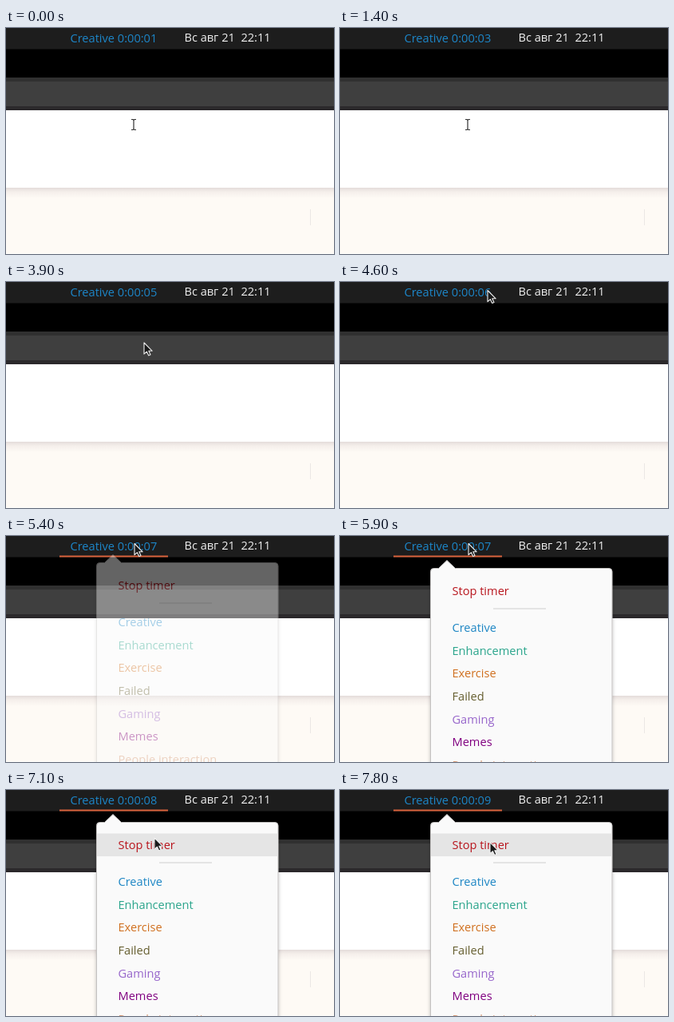
These frames come from a looping animation (411x283 px, 8 s). An HTML page:

```html
<!DOCTYPE html>
<html lang="en">
<head>
<meta charset="utf-8">
<title>Timer menu</title>
<style>
  html, body { margin: 0; width: 100%; height: 100%; overflow: hidden; background: #fff; }
  svg { display: block; width: 411px; height: 283px; }
  text { font: 14.6px "Open Sans", "Noto Sans", sans-serif; }
</style>
</head>
<body>
<svg viewBox="0 0 411 283" xmlns="http://www.w3.org/2000/svg">
  <defs>
    <linearGradient id="edge" x2="0" y2="1">
      <stop offset="0" stop-color="#e4dcda"/>
      <stop offset=".4" stop-color="#f5efeb"/>
      <stop offset="1" stop-color="#fefaf5"/>
    </linearGradient>
    <filter id="soft" x="-10%" y="-10%" width="120%" height="120%">
      <feDropShadow dx="0" dy="1" stdDeviation="2" flood-opacity=".25"/>
    </filter>
  </defs>

  <!-- page and window bars -->
  <rect width="411" height="283" fill="#fefaf5"/>
  <rect y="102" width="411" height="98" fill="#fff"/>
  <rect y="200" width="411" height="13" fill="url(#edge)"/>
  <rect x="381" y="227" width="1" height="20" fill="#ebe7e5"/>
  <rect y="282" width="411" height="1" fill="#fdfcfa"/>
  <rect width="411" height="103" fill="#2b292b"/>
  <rect y="62" width="411" height="5" fill="#303030"/>
  <rect y="67" width="411" height="31" fill="#3f3f3f"/>
  <rect y="26" width="411" height="36" fill="#000"/>
  <rect width="411" height="26.5" fill="#1d1d1d"/>

  <text id="timer" x="80.5" y="17.5" fill="#1d86c8"></text>
  <text x="223.5" y="17" fill="#f0f0f0">Вс авг 21&#160;&#160;22:11</text>
  <rect id="line" x="67" y="24.5" width="136" height="2" fill="#d9623c"/>

  <g id="menu">
    <path d="M117.5 40.5H123.5L134 30.5L144.5 40.5H337Q341 40.5 341 44.5V300H113.5V44.5Q113.5 40.5 117.5 40.5Z"
      fill="#fafafa" stroke="#c3c1c0" filter="url(#soft)"/>
    <rect id="hover" x="114" y="54.5" width="226.5" height="28.5" fill="#e5e5e5"/>
    <rect x="192" y="90.5" width="66" height="1" fill="#cfcfcf"/>
    <g id="items"></g>
  </g>

  <path id="beam" d="M-3 -6.5H-1L0 -5.5L1 -6.5H3M0 -5.5V5.5M-3 6.5H-1L0 5.5L1 6.5H3"
    fill="none" stroke="#333" stroke-width="1.2"/>
  <path id="arrow" d="M0 0V14.2L3.4 11.2L5.7 16L8 15L5.8 10.3H10.2Z"
    fill="#1a1a1a" stroke="#eee" stroke-width="1.1" stroke-linejoin="round"/>
</svg>
<script>
const LOOP = 8000, STEP = 100;
const $ = id => document.getElementById(id);

const items = [
  ["Stop timer", 74, "#b8141c"],
  ["Creative", 120, "#1d86c4"],
  ["Enhancement", 148.7, "#2aa58c"],
  ["Exercise", 177.3, "#d0701f"],
  ["Failed", 206, "#665f30"],
  ["Gaming", 234.6, "#9766cb"],
  ["Memes", 263.2, "#800080"],
  ["People interaction", 291.5, "#d59a78"]
];
for (const [label, y, color] of items) {
  const el = document.createElementNS("http://www.w3.org/2000/svg", "text");
  el.setAttribute("x", 140.5);
  el.setAttribute("y", y);
  el.setAttribute("fill", color);
  el.textContent = label;
  $("items").append(el);
}

// [time, seconds shown]
const ticks = [[0, 1], [1000, 2], [1400, 3], [2000, 4], [3100, 5], [4100, 6], [5100, 7], [6800, 8], [7600, 9]];

// [time, x, y]
const path = [
  [0, 160, 121], [3000, 160, 121], [3100, 168, 119.5], [3500, 170, 114],
  [3900, 173, 76], [4300, 180, 30], [4600, 185, 10.5], [4800, 185, 10.5],
  [5200, 161, 9.5], [5900, 161, 9.5], [6300, 173, 28], [6700, 183, 51],
  [7100, 186, 60], [7600, 187.5, 65], [7800, 188, 65.5]
];

// [time, opacity, lift]
const opening = [[5200, 0, -14], [5300, .12, -11], [5400, .4, -7], [5500, .8, -2.5], [5600, 1, 0]];

function mix(rows, t) {
  const next = rows.findIndex(r => r[0] > t);
  if (next === 0) return rows[0].slice(1);
  if (next < 0) return rows.at(-1).slice(1);
  const a = rows[next - 1], b = rows[next], k = (t - a[0]) / (b[0] - a[0]);
  return a.slice(1).map((v, i) => v + (b[i + 1] - v) * k);
}

const show = (id, on) => $(id).setAttribute("visibility", on ? "visible" : "hidden");
const move = (id, x, y) => $(id).setAttribute("transform", `translate(${x} ${y})`);

function draw(now) {
  const t = Math.floor((now % LOOP) / STEP) * STEP;
  const [x, y] = mix(path, t);
  const [alpha, lift] = mix(opening, t);
  const seconds = ticks.findLast(r => r[0] <= t)[1];

  $("timer").textContent = `Creative 0:00:0${seconds}`;
  show("line", t >= 5300);
  show("hover", t >= 5600 && y >= 54.5);
  $("menu").setAttribute("opacity", alpha);
  move("menu", 0, lift);

  const onPage = y > 103;
  show("beam", onPage);
  show("arrow", !onPage);
  move("beam", x, y);
  move("arrow", x, y);
}

const start = performance.now();
function frame() {
  draw(performance.now() - start);
  requestAnimationFrame(frame);
}
frame();
</script>
</body>
</html>
```
